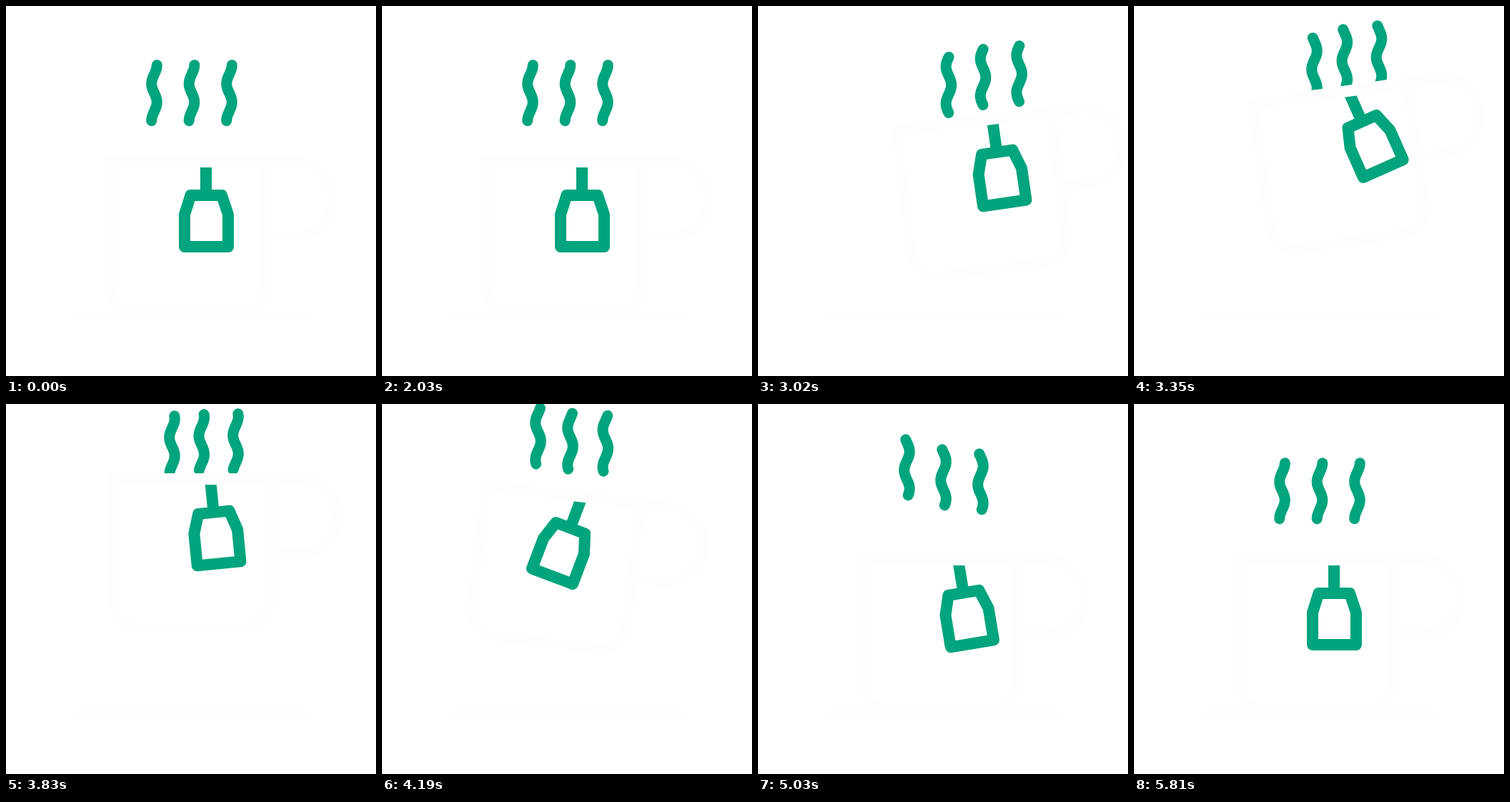
Recreate the animation shown at these times as an HTML page. Size 518 by 518 pixels, loop 5840 ms.

```html
<!DOCTYPE html>
<html lang="en">
<head>
<meta charset="utf-8">
<title>Tea cup</title>
<style>
  html, body { margin: 0; width: 100%; height: 100%; overflow: hidden; background: #fff; }
  svg { display: block; width: 100vw; height: 100vh; }
  path { fill: none; stroke-linejoin: round; }
  .steam { stroke: #00a47d; stroke-width: 15; stroke-linecap: round; }
  .tag { stroke: #00a47d; stroke-width: 16; }
  .cup { stroke: #fefefe; stroke-width: 16; }
  .body { fill: #fff; }
</style>
</head>
<body>
<svg viewBox="0 0 518 518">
  <path class="cup" d="M95 435H425"/>
  <path class="steam"/>
  <path class="steam"/>
  <path class="steam"/>
  <!-- cup and tag are drawn around the point where the string meets the rim -->
  <g class="tilt">
    <path class="cup" d="M83 0H125A52 52 0 0 1 125 105H83"/>
    <path class="cup body" d="M-135 0H83V167Q83 209 43 209H-95Q-135 209-135 167Z"/>
  </g>
  <g id="tag">
    <path class="tag" d="M0 0V47M-21.5 47H22L31 74V119H-30V74Z"/>
  </g>
  <g class="tilt"><path class="cup" d="M-143 0H91"/></g>
</svg>
<script>
const LOOP = 5840, REST = 2030, STEP = 30;

// Monotone cubic through the keys, flat at both ends and at extremes
function track(ts, vs) {
  const slope = i => (vs[i + 1] - vs[i]) / (ts[i + 1] - ts[i]);
  const tangent = i => {
    if (i === 0 || i === ts.length - 1) return 0;
    const a = slope(i - 1), b = slope(i);
    return a * b <= 0 ? 0 : 2 * a * b / (a + b);
  };
  return t => {
    if (t >= ts[ts.length - 1]) return vs[vs.length - 1];
    let i = 0;
    while (t >= ts[i + 1]) i++;
    const h = ts[i + 1] - ts[i], u = (t - ts[i]) / h, w = 1 - u;
    return vs[i] * w * w * (1 + 2 * u) + vs[i + 1] * u * u * (3 - 2 * u)
      + h * u * w * (tangent(i) * w - tangent(i + 1) * u);
  };
}

const KEYS = [0, 300, 630, 900, 1170, 1320, 1800, 2200, 2490, 2640, 2970, 3570];
const keyed = (...vs) => track(KEYS, vs);

const cup = {
  x: keyed(0, 20, 59, 54, 29, 20, 6, 0, 6, 3, 0, 0),
  y: keyed(0, -5, -21, -50, -80, -99, -113, -84, -21, 0, 0, 0),
  tilt: keyed(0, -2, -4, -6, -8, -8, 0, 7, 6.5, 3, 0, 0)
};
const swing = track(
  [0, 400, 630, 900, 1050, 1270, 1320, 1800, 2420, 2980, 3350, 3780],
  [0, 10, 7, 0, -14, -25, -24, -5.6, 32, -9.5, 3.5, 0]);

// Left steam trails, right steam leads, the middle one lies between
const left = {
  x: keyed(0, 17, 52, 61, 52, 45, 25, 10, 5, 3, 1, 0),
  y: keyed(0, 3, 8, -5, -26, -38, -66, -77, -70, -61, -35, 0)
};
const right = {
  x: keyed(0, 17, 51.5, 57, 38, 30.5, 9, 0, -1, -1, -1, 0),
  y: keyed(0, 3, 8, -18, -44, -55, -69, -66, -48, -37, -14, 0)
};
const rise = keyed(0, 12, 35, 58, 77, 86, 100, 111, 120, 125, 138, 156);

const steams = [...document.querySelectorAll('.steam')];
const tilts = document.querySelectorAll('.tilt');
const tag = document.getElementById('tag');

function wave(x, y, shift) {
  const pts = [];
  for (let d = 0; d <= 78; d += 3) {
    const dx = 3.8 * Math.cos((d + shift) / 52 * 2 * Math.PI);
    pts.push((x + dx).toFixed(2) + ' ' + (y + d).toFixed(2));
  }
  return 'M' + pts.join('L');
}

function draw(t) {
  const lerp = axis => k => left[axis](t) + (right[axis](t) - left[axis](t)) * k;
  const sx = lerp('x'), sy = lerp('y');
  steams.forEach((s, i) => {
    const k = [0, 0.7, 1][i];
    s.setAttribute('d', wave(207.5 + 52.5 * i + sx(k), 82.7 + sy(k), rise(t)));
  });
  const place = `translate(${280 + cup.x(t)} ${218 + cup.y(t)}) rotate(`;
  tilts.forEach(g => g.setAttribute('transform', place + cup.tilt(t) + ')'));
  tag.setAttribute('transform', place + swing(t) + ')');
}

const start = performance.now();
function frame() {
  const t = (performance.now() - start) % LOOP - REST;
  draw(Math.max(0, Math.floor(t / STEP) * STEP));
  requestAnimationFrame(frame);
}
frame();
</script>
</body>
</html>
```
